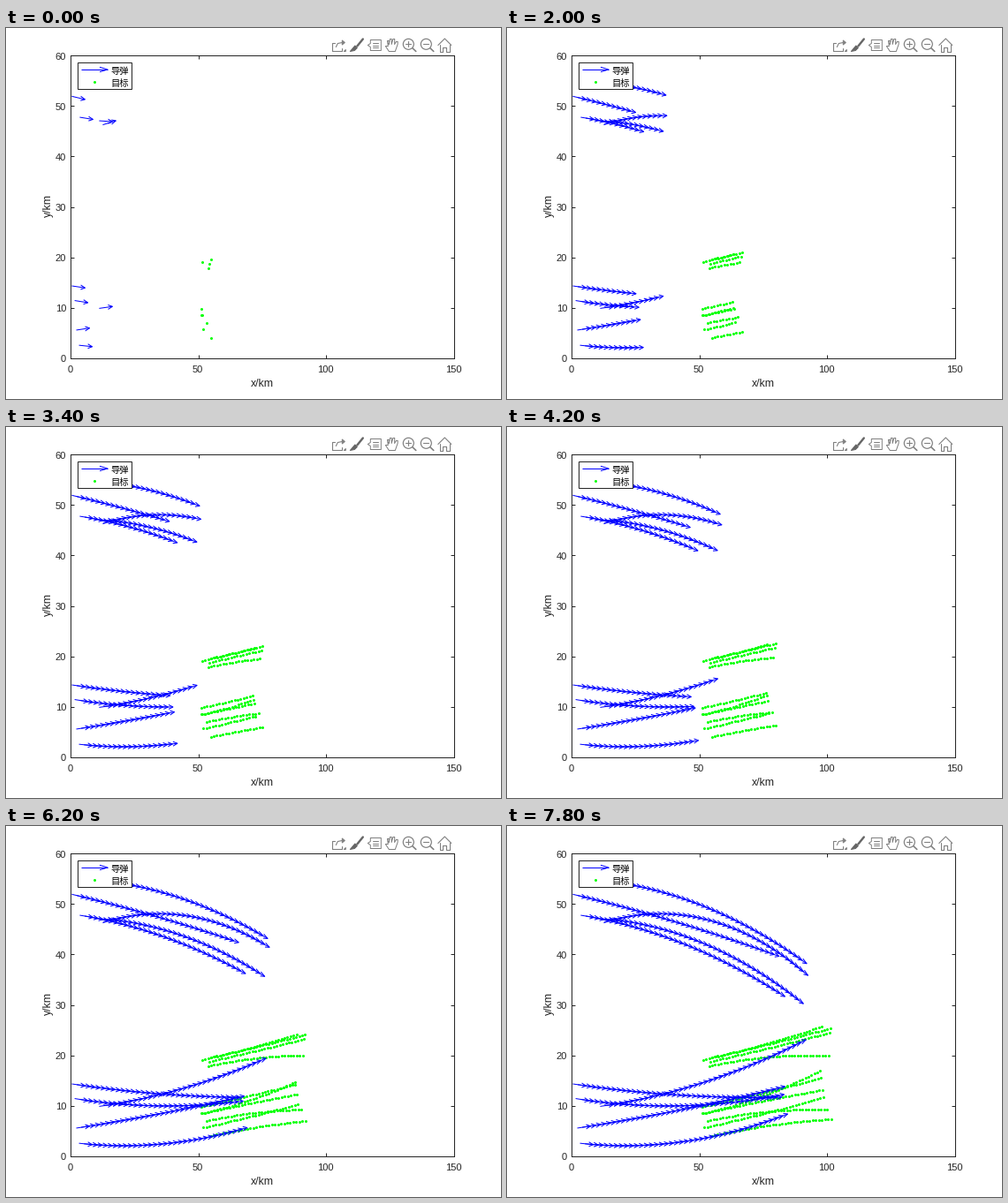
Write a matplotlib script that moves like this. It is 560x420 px and loops after 8 s.

```python
import numpy as np
import matplotlib.pyplot as plt
from matplotlib.animation import FuncAnimation
from matplotlib.collections import LineCollection
from matplotlib.patches import Circle, Polygon, Rectangle

W, H, DPI = 560, 420, 100
PT = 72 / DPI                               # points per pixel
STEPS, INTERVAL = 40, 200
LEFT, RIGHT, TOP, BOTTOM = 73, 507, 31, 374
X_MAX, Y_MAX = 150, 60                      # km
INK, GREY, DARK = "#262626", "#808080", "#666666"
BLUE, GREEN = "#0000ff", "#00ff00"

MISSILE_SPEED, TARGET_SPEED = 1.96, 1.2     # km per step
ARROW = 2.65                                # arrow length in steps
TARGET_LAUNCH = 6.4                         # shared first pitch, degrees

# start x, start y, first pitch, last pitch
MISSILES = [
    (0.5, 51.9, -6.9, -10.2), (3.6, 47.75, -4.7, -17.3), (11.2, 47.05, -1.9, -20.8),
    (12.6, 46.25, 9, -21.9), (12.3, 54.6, -3.3, -19),
    (0.5, 14.35, -4.3, 0.3), (1.6, 11.45, -4.6, 5.1), (11.2, 9.9, 4.1, 13.9),
    (2.25, 5.6, 4.4, 7), (3.3, 2.6, -3.1, 10.4),
]
# start x, start y, last pitch
TARGETS = [
    (51.5, 19.15, 9.7), (54.8, 19.6, 7.8), (54.4, 18.8, 7.6), (53.75, 17.85, -1.3),
    (51, 9.8, 7.6), (51.3, 8.5, 14.5), (51.5, 8.5, 5),
    (53.2, 7, -1), (52, 5.7, 8.2), (54.8, 4.05, 1.7),
]


def fly(x, y, first, last, speed):
    """Constant speed and steady turn: positions and velocities per step."""
    pitch = np.radians(np.linspace(first, last, STEPS))
    vel = speed * np.column_stack([np.cos(pitch), np.sin(pitch)])
    moves = (vel[:-1] + vel[1:]) / 2
    return np.vstack([[x, y], [x, y] + np.cumsum(moves, axis=0)]), vel


def arrow(tail, vec, back=0.33, wide=0.084):
    """Shaft and open head."""
    tail, vec = np.asarray(tail, float), np.asarray(vec, float)
    tip = tail + vec
    base = tip - back * vec
    side = wide * np.array([-vec[1], vec[0]])
    return [np.array([tail, tip]), np.array([base + side, tip, base - side])]


fig = plt.figure(figsize=(W / DPI, H / DPI), dpi=DPI, facecolor="white")

ax = fig.add_axes([LEFT / W, 1 - BOTTOM / H, (RIGHT - LEFT) / W, (BOTTOM - TOP) / H])
ax.set(xlim=(0, X_MAX), ylim=(0, Y_MAX),
       xticks=range(0, X_MAX + 1, 50), yticks=range(0, Y_MAX + 1, 10))
ax.tick_params(direction="in", top=True, right=True, length=4.3 * PT, width=PT,
               color=INK, labelbottom=False, labelleft=False)
for spine in ax.spines.values():
    spine.set(color=INK, linewidth=PT)

# pixel layer for text, legend and toolbar
top = fig.add_axes([0, 0, 1, 1], zorder=5)
top.set(xlim=(0, W), ylim=(H, 0))
top.axis("off")


def label(x, y, s, size, font="Liberation Sans", color=INK, **kw):
    top.text(x, y, s, fontsize=size * PT, family=font, color=color, zorder=9, **kw)


def draw_labels():
    for v in ax.get_xticks():
        label(LEFT - 0.5 + v * (RIGHT - LEFT) / X_MAX, 389.5, f"{v:.0f}", 11.1, ha="center")
    for v in ax.get_yticks():
        label(68, BOTTOM + 4.5 - v * (BOTTOM - TOP) / Y_MAX, f"{v:.0f}", 11.1, ha="right")
    label(289.5, 405.5, "x/km", 12.2, ha="center")
    label(47.5, 201, "y/km", 12.2, ha="center", va="center", rotation=90)


def draw_legend():
    top.add_patch(Rectangle((81, 39), 61, 30, fc="white", ec=INK, lw=PT))
    top.add_collection(LineCollection(arrow((85, 47), (30, 0), 0.3, 0.09),
                                      colors=BLUE, linewidths=PT, zorder=3))
    top.plot(99.5, 61, "o", color=GREEN, ms=3 * PT, mew=0)
    for y, s in ((48, "导弹"), (62, "目标")):
        label(118, y, s, 10.3, "Noto Sans CJK JP", "black", va="center_baseline")


class Icon:
    """Draws with points given from the centre of one toolbar slot."""

    def __init__(self, slot):
        self.centre = np.array([376.3 + 20 * slot, 19.5])

    def stroke(self, *points, width=1.1, color=GREY):
        top.plot(*(self.centre + points).T, color=color, lw=width * PT,
                 solid_capstyle="round", solid_joinstyle="round")

    def shape(self, *points, fill="none", edge=GREY):
        top.add_patch(Polygon(self.centre + points, fc=fill, ec=edge, lw=PT,
                              joinstyle="round"))

    def ring(self, x, y, r):
        top.add_patch(Circle(self.centre + [x, y], r, fill=False, ec=GREY, lw=1.2 * PT))


def draw_toolbar():
    export, brush, tip, hand, zoom_in, zoom_out, home = map(Icon, range(7))

    export.stroke((-4, -3), (-7, -3), (-7, 6), (4, 6), (4, 3))
    export.stroke((-3, 2), (-1, -2), (4, -3))
    export.shape((4, -5.5), (7, -3), (4, -0.5), fill=GREY)
    export.shape((6, 7), (8, 5), (8, 7), fill=GREY)

    brush.stroke((7.5, -7), (1, 1), width=2.4, color=DARK)
    brush.shape((-1.5, 0.5), (1, 3), (-2, 6), (-7, 7), fill=DARK, edge=DARK)

    tip.shape((-4, -6), (8, -6), (8, 6), (-4, 6), (-4, 2), (-7, 0), (-4, -2))
    for y in (-2.5, 0, 2.5):
        tip.stroke((-1, y), (5, y), width=1)

    outline = [(-3, 7), (-7, 1), (-4, 1)]
    for x, y in ((-4, -5), (-1, -7), (2.5, -7), (6, -4)):
        outline += [(x - 0.9, y), (x + 0.9, y), (x + 0.8, -1)]
    hand.shape(*outline, (4, 7))

    for icon in (zoom_in, zoom_out):
        icon.ring(-1, -1.2, 6)
        icon.stroke((3.5, 3.2), (7.5, 7), width=1.6)
        icon.stroke((-4, -1.2), (2, -1.2))
    zoom_in.stroke((-1, -4.2), (-1, 1.8))

    home.stroke((-7.5, 0), (0, -7.5), (7.5, 0))
    home.stroke((-5.5, -1), (-5.5, 7), (-2, 7), (-2, 2), (2, 2), (2, 7), (5.5, 7), (5.5, -1))


draw_labels()
draw_legend()
draw_toolbar()

missiles = [fly(*m, MISSILE_SPEED) for m in MISSILES]
targets = [fly(x, y, TARGET_LAUNCH, last, TARGET_SPEED)[0] for x, y, last in TARGETS]

layers = []
for k in range(STEPS):
    parts = [p for pos, vel in missiles for p in arrow(pos[k], ARROW * vel[k])]
    arrows = LineCollection(parts, colors=BLUE, linewidths=PT, zorder=5 + k)
    ax.add_collection(arrows)
    dots, = ax.plot(*np.array([t[k] for t in targets]).T, "o", color=GREEN,
                    ms=3 * PT, mew=0, zorder=5.5 + k)
    layers.append((arrows, dots))


def draw(i):
    for k, layer in enumerate(layers):
        for artist in layer:
            artist.set_visible(k <= i)
    return [artist for layer in layers for artist in layer]


anim = FuncAnimation(fig, draw, frames=STEPS, interval=INTERVAL,
                     init_func=lambda: draw(0), repeat=True, repeat_delay=0, blit=False)
plt.show()
```
